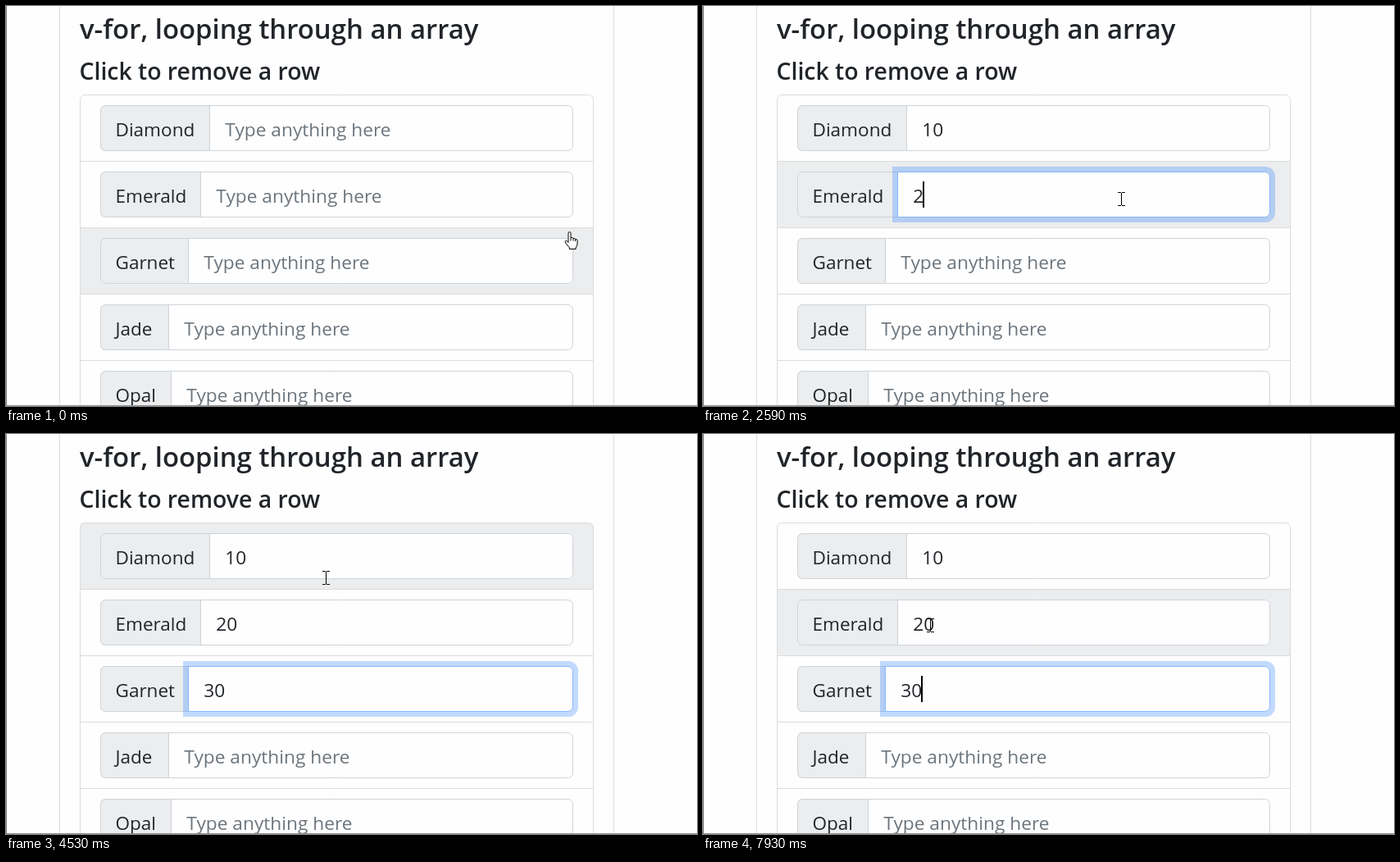
Animation, 843 px wide and 488 px high, one loop 8 s. Source, as an HTML page with a canvas:

```html
<!DOCTYPE html>
<html lang="en">
<head>
<meta charset="utf-8">
<title>Removable rows</title>
<style>
  html, body { margin: 0; width: 843px; height: 488px; overflow: hidden; background: #fefefe; }
  canvas { display: block; }
</style>
</head>
<body>
<canvas id="stage" width="843" height="488"></canvas>
<script>
const ctx = document.getElementById('stage').getContext('2d');
const LOOP = 8000, TICK = 127.8, BLINK = 506, KEY_GAP = 130;
const FAMILY = '"Open Sans", "Noto Sans", sans-serif';
const INK = '#212529', MUTED = '#6c757d', PAPER = '#fefefe';
const SHADE = '#ebedee', LINE = '#dcdcdc', EDGE = '#ced4da';

// List and input geometry
const LEFT = 90, RIGHT = 717, TOP = 108, STEP = 81;
const BOX_L = 115, BOX_R = 692, BOX_H = 56, RADIUS = 6, GLOW = 6;

// focus and typing are start times in ms
const rows = [
  { name: 'Diamond', split: 248, value: '10', focus: 790, typing: 1310 },
  { name: 'Emerald', split: 237, value: '20', focus: 1940, typing: 2470 },
  { name: 'Garnet', split: 222, value: '30', focus: 2980, typing: 3630 },
  { name: 'Jade', split: 198 },
  { name: 'Opal', split: 201 }
];

// Pointer moves: from tick, to tick, x, y; it rests in between
const start = { x: 687, y: 275 };
const moves = [
  [0, 4, 525, 152], [11, 14, 510, 235], [20, 22, 507, 310], [30, 31, 447, 291],
  [31, 38, 348, 88], [39, 41, 129, 99], [41, 46, 303, 98], [47, 48, 306, 127],
  [48, 50, 203, 168], [51, 53, 276, 168], [53, 56, 284, 178], [56, 58, 188, 226],
  [59, 62, 277, 233]
];

const hand = new Path2D('M4.5 13.5V2.2Q4.5.6 6 .6T7.5 2.2V7.6Q10.3 6.9 10.5 8.5Q12.8 7.9 13 9.5' +
  'Q15.4 9 15.5 11V15Q15.5 18 13.6 20V21.5H6V20L1.2 14.2Q-.2 11.8 1.6 11.2Q3 11.3 4.5 13.5Z');
const knuckles = new Path2D('M7.5 7.6V11.5M10.5 8.5V11.5M13 9.5V12');
const ibeam = new Path2D('M-4.5 -8H-.5M.5 -8H4.5M0 -7.5V7.5M-4.5 8H-.5M.5 8H4.5');

const clamp = v => Math.min(1, Math.max(0, v));
const rowTop = i => TOP + STEP * i;
const boxTop = i => rowTop(i) + 13;

function text(str, x, y, size, color, weight = 400) {
  ctx.font = `${weight} ${size}px ${FAMILY}`;
  ctx.fillStyle = color;
  ctx.fillText(str, x, y);
}

function rect(color, x, y, w, h) {
  ctx.fillStyle = color;
  ctx.fillRect(x, y, w, h);
}

function panel(color, x, y, w, h, radii) {
  ctx.beginPath();
  ctx.roundRect(x, y, w, h, radii);
  ctx.fillStyle = color;
  ctx.fill();
}

function outline(color, x, y, w, h, radii) {
  ctx.beginPath();
  ctx.roundRect(x + 0.5, y + 0.5, w - 1, h - 1, radii);
  ctx.strokeStyle = color;
  ctx.lineWidth = 1;
  ctx.stroke();
}

function pointerAt(t) {
  const tick = Math.floor(t / TICK);
  let { x, y } = start;
  for (const [from, to, toX, toY] of moves) {
    const k = clamp((tick - from) / (to - from));
    x += (toX - x) * k;
    y += (toY - y) * k;
  }
  return { x: Math.round(x), y: Math.round(y) };
}

function overInput({ x, y }) {
  return rows.some((r, i) => x >= r.split && x < BOX_R && y >= boxTop(i) && y < boxTop(i) + BOX_H);
}

// Short focus transition, seen in two steps
const fade = (t, from) => t < from ? 0 : t < from + KEY_GAP ? 0.6 : 1;

function drawGlow(row, y, level) {
  const x = row.split, w = BOX_R - x, spread = GLOW * level, r = RADIUS + spread;
  ctx.globalAlpha = level;
  ctx.beginPath();
  ctx.roundRect(x - spread, y - spread, w + 2 * spread, BOX_H + 2 * spread, [0, r, r, 0]);
  ctx.roundRect(x, y, w, BOX_H, [0, RADIUS, RADIUS, 0]);
  ctx.fillStyle = 'rgba(13,110,253,.25)';
  ctx.fill('evenodd');
  outline('#86b7fe', x, y, w, BOX_H, [0, RADIUS, RADIUS, 0]);
  ctx.globalAlpha = 1;
}

function drawRow(row, i, t) {
  const y = boxTop(i), base = y + 38, x = row.split + 19;
  const { focus = Infinity, typing = Infinity, value = '' } = row;
  const blur = rows[i + 1]?.focus ?? Infinity;

  panel(PAPER, BOX_L, y, BOX_R - BOX_L, BOX_H, RADIUS);
  panel(SHADE, BOX_L, y, row.split - BOX_L, BOX_H, [RADIUS, 0, 0, RADIUS]);
  outline(EDGE, BOX_L, y, BOX_R - BOX_L, BOX_H, RADIUS);
  rect(EDGE, row.split, y, 1, BOX_H);

  const level = fade(t, focus) - fade(t, blur);
  if (level > 0) drawGlow(row, y, level);

  const typed = t < typing ? '' : value.slice(0, 1 + Math.floor((t - typing) / KEY_GAP));
  text(row.name, 133.5, base, 22.5, INK);
  text(typed || 'Type anything here', x + 0.3, base, 22.7, typed ? INK : MUTED);

  // The caret restarts its blink with each key
  const active = typed ? typing + KEY_GAP * (typed.length - 1) : focus;
  if (t >= focus && t < blur && Math.floor((t - active) / BLINK) % 2 === 0) {
    rect('#000', Math.round(x + ctx.measureText(typed).width - 0.5), y + 12, 2, 32);
  }
}

function drawPointer(p) {
  ctx.save();
  ctx.lineWidth = 1;
  ctx.strokeStyle = '#000';
  if (p.y < TOP || overInput(p)) {
    ctx.translate(p.x + 0.5, p.y + 0.5);
    ctx.stroke(ibeam);
  } else {
    ctx.translate(p.x - 5.5, p.y);
    ctx.fillStyle = '#fff';
    ctx.fill(hand);
    ctx.stroke(hand);
    ctx.stroke(knuckles);
  }
  ctx.restore();
}

function draw(t) {
  const pointer = pointerAt(t);
  const hover = Math.floor((pointer.y - TOP) / STEP);

  rect(PAPER, 0, 0, 843, 488);
  rect('#dfdfdf', 65, 0, 1, 488);
  rect('#dfdfdf', 741, 0, 1, 488);

  text('v-for, looping through an array', 90, 40, 32.9, INK, 600);
  text('Click to remove a row', 89.5, 90, 28.4, INK, 600);

  if (hover >= 0) {
    const corner = hover ? 0 : RADIUS;
    panel(SHADE, LEFT, rowTop(hover), RIGHT - LEFT, STEP, [corner, corner, 0, 0]);
  }
  outline(LINE, LEFT, TOP, RIGHT - LEFT, 500, RADIUS);
  for (let i = 1; i < rows.length; i++) rect(LINE, LEFT, rowTop(i), RIGHT - LEFT, 1);
  rows.forEach((row, i) => drawRow(row, i, t));

  rect('#808080', 0, 0, 1, 488);
  rect('#909090', 0, 487, 843, 1);
  drawPointer(pointer);
}

function tick() {
  draw(performance.now() % LOOP);
  requestAnimationFrame(tick);
}
tick();
</script>
</body>
</html>
```
